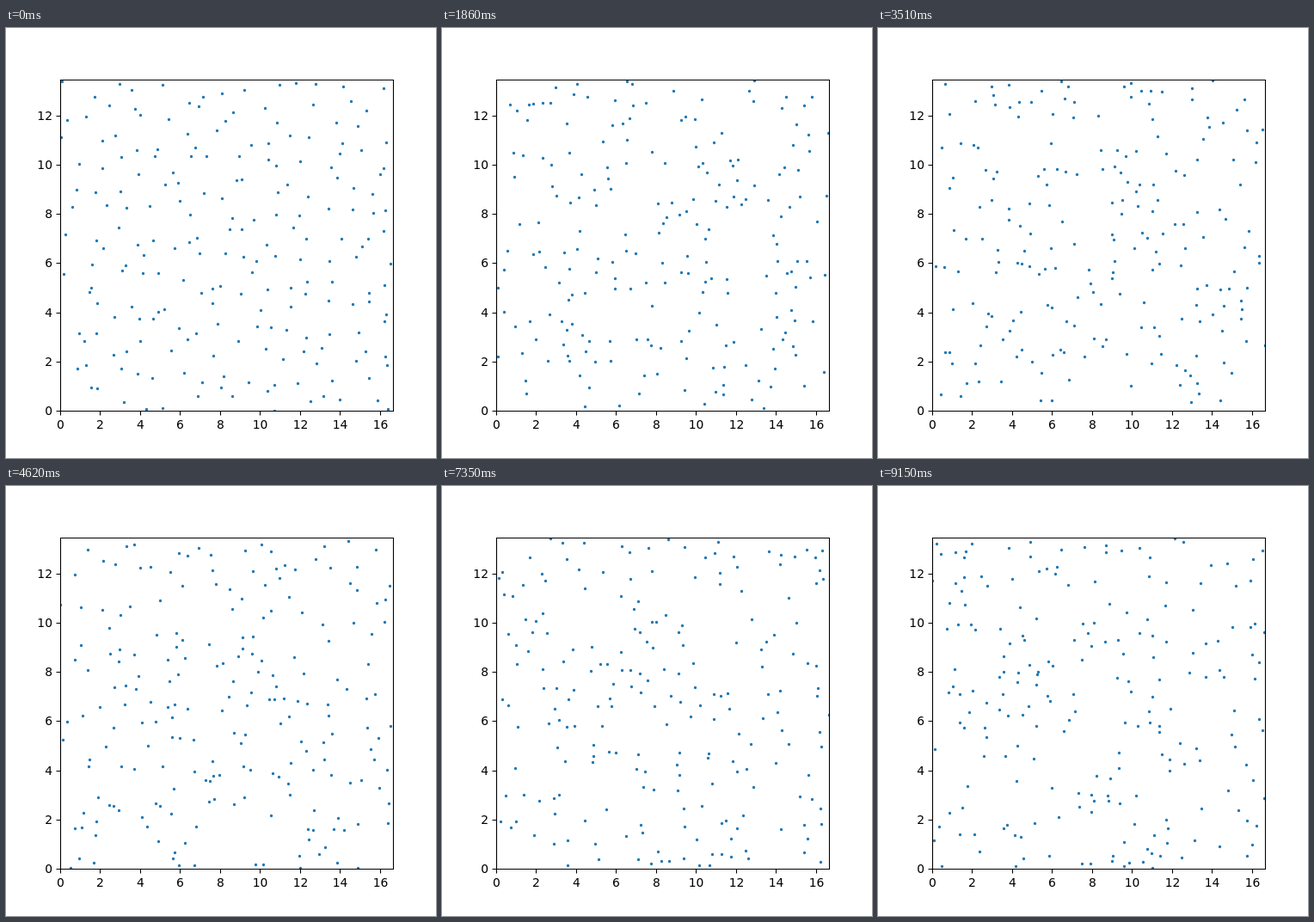
An HTML page for the animation above (9.18 s loop, 500 px wide and 500 px high).

```html
<!DOCTYPE html>
<html lang="en">
<head>
<meta charset="utf-8">
<title>Particles in a periodic box</title>
<style>
  html, body { margin: 0; width: 100%; height: 100%; overflow: hidden; background: #fff; }
  svg { display: block; }
  text { font: 13.89px "DejaVu Sans", sans-serif; }
  #dots { fill: none; stroke: #1f77b4; stroke-width: 3.4; stroke-linecap: round; }
  #axes { fill: none; stroke: #000; stroke-width: 1.1; }
</style>
</head>
<body>
<svg width="500" height="500" viewBox="0 0 500 500">
  <clipPath id="box"><rect x="63" y="60" width="387" height="385"/></clipPath>
  <g clip-path="url(#box)"><path id="dots"/></g>
  <path id="axes"/>
  <g id="labels"></g>
</svg>
<script>
const COLS = 15, ROWS = 14, GAP = 1.11;
const W = COLS * GAP, H = ROWS * GAP * Math.sqrt(3) / 2;
const FRAMES = 306, STEP = 30;
const SPEED = 0.015, REACH = 0.5, PUSH = 0.004;
const px = x => 62.5 + x * 387.5 / W;
const py = y => 445 - y * 385 / H;
const snap = v => Math.round(v) + 0.5;
const wrap = (v, size) => (v % size + size) % size;
const nearest = (d, size) => d - size * Math.round(d / size);

let seed = 20;
function random() {
  seed = (Math.imul(seed, 1664525) + 1013904223) >>> 0;
  return seed / 2 ** 32;
}
const jitter = () => random() - 0.5;
const normal = () => Math.sqrt(-2 * Math.log(1 - random())) * Math.cos(2 * Math.PI * random());

function drawAxes() {
  let d = 'M63.5 60.5H450.5V445.5H63.5Z', text = '';
  for (let n = 0; n <= 16; n += 2) {
    const x = snap(px(n));
    d += `M${x} 445.5v5`;
    text += `<text x="${x}" y="465.5" text-anchor="middle">${n}</text>`;
  }
  for (let n = 0; n <= 12; n += 2) {
    const y = snap(py(n));
    d += `M63.5 ${y}h-5`;
    text += `<text x="54" y="${y + 4.5}" text-anchor="end">${n}</text>`;
  }
  document.getElementById('axes').setAttribute('d', d);
  document.getElementById('labels').innerHTML = text;
}

// A shaken triangular lattice with thermal velocities.
const particles = Array.from({ length: COLS * ROWS }, (_, i) => {
  const row = Math.floor(i / COLS);
  return {
    x: wrap((i % COLS + row % 2 / 2) * GAP + jitter(), W),
    y: wrap((row + 0.5) * H / ROWS + jitter(), H),
    vx: SPEED * normal(),
    vy: SPEED * normal()
  };
});

// Soft short-range repulsion across the periodic edges.
function advance() {
  particles.forEach((a, i) => {
    for (let j = i + 1; j < particles.length; j++) {
      const b = particles[j];
      const dx = nearest(a.x - b.x, W), dy = nearest(a.y - b.y, H);
      const r = Math.hypot(dx, dy);
      if (r >= REACH || r === 0) continue;
      const f = PUSH * (1 - r / REACH) / r;
      a.vx += f * dx; a.vy += f * dy;
      b.vx -= f * dx; b.vy -= f * dy;
    }
  });
  for (const p of particles) {
    p.x = wrap(p.x + p.vx, W);
    p.y = wrap(p.y + p.vy, H);
  }
}

const poses = [];
for (let i = 0; i < FRAMES; i++) {
  poses.push(particles.map(p => `M${snap(px(p.x))} ${snap(py(p.y))}h0`).join(''));
  advance();
}

const dots = document.getElementById('dots');
const start = performance.now();
function draw() {
  const i = Math.floor((performance.now() - start) / STEP) % FRAMES;
  dots.setAttribute('d', poses[i]);
  requestAnimationFrame(draw);
}
drawAxes();
draw();
</script>
</body>
</html>
```
